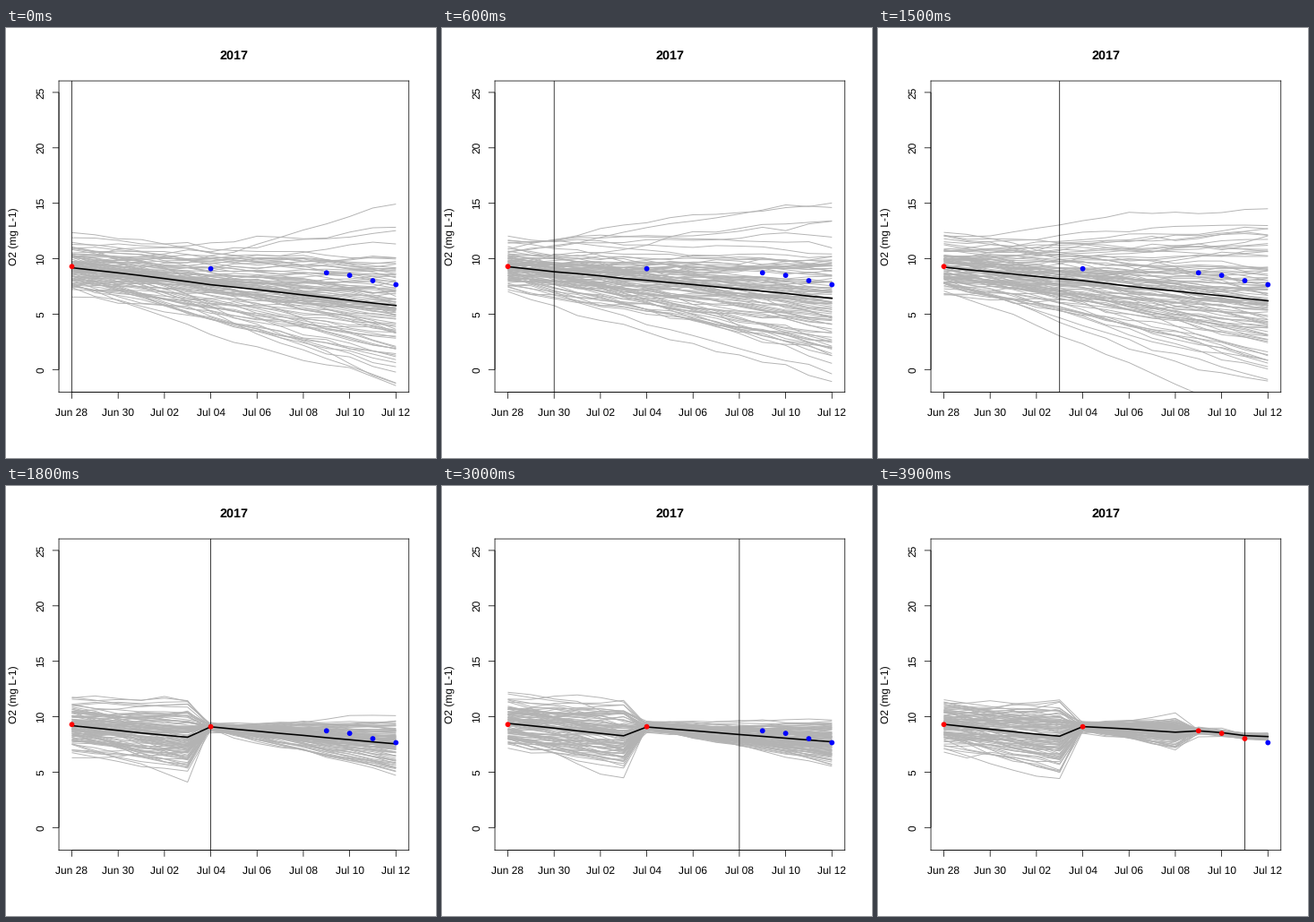
Write a matplotlib script that moves like this. It is 480 px wide and 480 px high and loops after 4.2 s.

```python
import numpy as np
import matplotlib.pyplot as plt
from matplotlib.animation import FuncAnimation
from matplotlib.collections import LineCollection

SIZE, DPI = 480, 72
MEMBERS = 100
DAYS = np.arange(15)
OBSERVED = {0: 9.3, 6: 9.1, 11: 8.73, 12: 8.5, 13: 8.02, 14: 7.66}
OBS_ERROR = 0.2
LEFT, BOTTOM = -0.56, -2.04
THIN = 0.75


def ensemble(today):
    """Members drift apart; each observation up to today pulls them together."""
    rng = np.random.default_rng(170 + today)

    def draw_rates(updates):
        damping = 1 + 0.5 * updates
        return rng.normal(-0.235, 0.2, MEMBERS) / damping, 0.2 / damping

    level = rng.normal(9.28, 1.1, MEMBERS)
    rate, noise = draw_rates(0)
    updates = 0
    paths = [level]
    for day in DAYS[1:]:
        level = level + rate + rng.normal(0, noise, MEMBERS)
        if day <= today and day in OBSERVED:
            gain = level.var() / (level.var() + OBS_ERROR ** 2)
            measured = rng.normal(OBSERVED[day], OBS_ERROR, MEMBERS)
            level = level + gain * (measured - level)
            updates += 1
            rate, noise = draw_rates(updates)
        paths.append(level)
    return np.array(paths).T


def label(x, y, text, size=12, **style):
    fig.text(x / SIZE, 1 - y / SIZE, text, fontsize=size, ha="center",
             va="baseline", rotation_mode="anchor", **style)


plt.rcParams.update({"font.family": "Liberation Sans", "text.hinting": "none"})
fig = plt.figure(figsize=(SIZE / DPI, SIZE / DPI), dpi=DPI, facecolor="white")
ax = fig.add_axes([59.04 / SIZE, 73.44 / SIZE, 390.72 / SIZE, 347.52 / SIZE])
ax.set(xlim=(LEFT, 14.56), ylim=(BOTTOM, 26.04), xticks=[], yticks=[])
for spine in ax.spines.values():
    spine.set(linewidth=THIN, snap=False)

# Axis lines and ticks
thin = dict(colors="black", linewidths=THIN, clip_on=False, snap=False)
ax.hlines(BOTTOM, 0, 14, **thin)
ax.vlines(LEFT, 0, 25, **thin)
ax.vlines(range(0, 15, 2), BOTTOM - 0.582, BOTTOM, **thin)
ax.hlines(range(0, 26, 5), LEFT - 0.279, LEFT, **thin)

for i in range(8):
    date = f"Jun {28 + 2 * i}" if i < 2 else f"Jul {2 * i - 2:02d}"
    label(73.5 + 51.69 * i, 433, date)
for value in range(0, 26, 5):
    label(42, 381.3 - 12.376 * value, str(value), rotation=90)
label(13, 232.8, "O2 (mg L-1)", rotation=90)
label(254.4, 35, "2017", 14.4, weight="bold")

members = ax.add_collection(
    LineCollection([], colors="#b3b3b3", linewidths=0.95, zorder=1), autolim=False)
mean_line, = ax.plot([], [], color="black", lw=1.6, zorder=2)
today_line = ax.axvline(0, color="black", lw=THIN, snap=False, zorder=2.2)
dots = ax.scatter(list(OBSERVED), list(OBSERVED.values()), s=5.8 ** 2,
                  linewidths=0, zorder=3)
ax.set(xlim=(LEFT, 14.56), ylim=(BOTTOM, 26.04))


def update(today):
    paths = ensemble(today)
    members.set_segments([np.column_stack((DAYS, path)) for path in paths])
    mean_line.set_data(DAYS, paths.mean(axis=0))
    today_line.set_xdata([today, today])
    dots.set_facecolor(["red" if day <= today else "blue" for day in OBSERVED])
    return members, mean_line, today_line, dots


anim = FuncAnimation(fig, update, frames=14, interval=300, repeat=True,
                     repeat_delay=0, blit=False)
plt.show()
```
